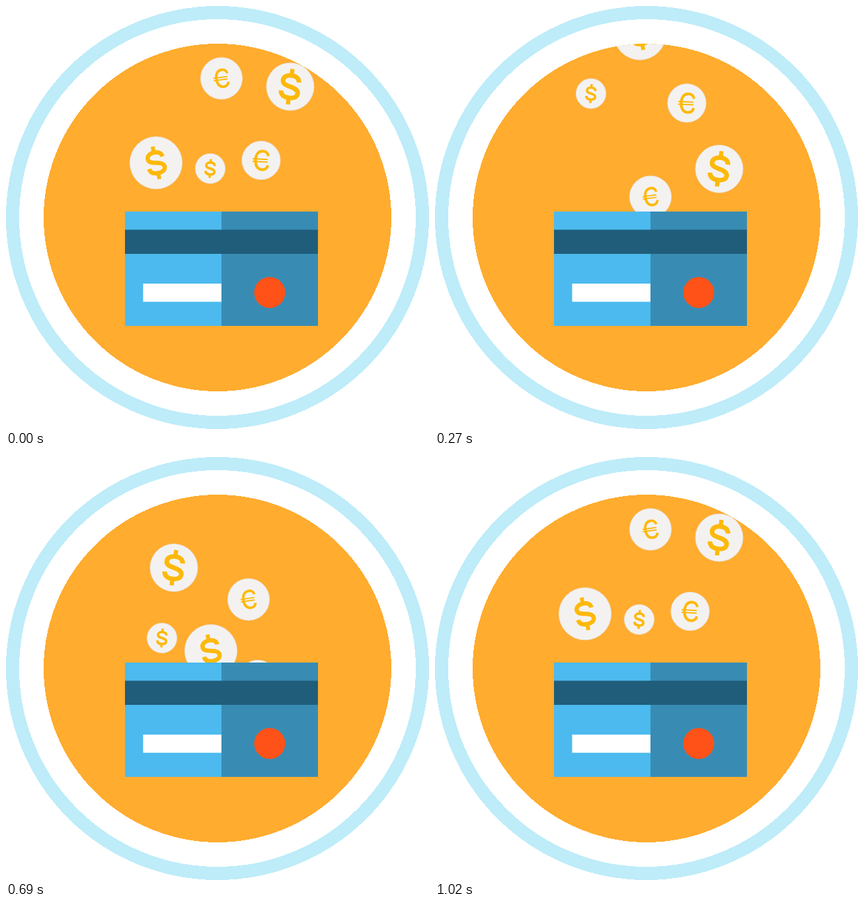
An HTML page for the animation above (1050 ms loop, 640x640 px).

```html
<!DOCTYPE html>
<html lang="en">
<head>
<meta charset="utf-8">
<title>Coins falling into a card</title>
<style>
  html, body { margin: 0; width: 100%; height: 100%; overflow: hidden; background: #fff; }
  svg { display: block; width: 100%; height: 100%; }
</style>
</head>
<body>
<svg viewBox="0 0 640 640">
  <defs>
    <clipPath id="disc"><circle cx="320" cy="320" r="263"/></clipPath>
    <g id="dollar" fill="none" stroke="#fdb90b" stroke-width="7">
      <path d="M12.3-8C12-14 7-17 0-17C-7-17-12-13.5-12-8.5C-12-3-7-1.6 0 0C8 1.8 12.5 4 12.5 9C12.5 14 7.5 17 0 17C-7.5 17-12.5 14-13 7.5"/>
      <path d="M0-27V-17M0 17V27" stroke-width="6.4"/>
    </g>
    <g id="euro" fill="none" stroke="#fdb90b" stroke-width="4.2">
      <path d="M10.5-7C10-11.5 6.5-14 2-14C-5-14-8.5-8-8.5 0C-8.5 8-5 14 2 14C6.5 14 10 11.5 10.5 7"/>
      <path d="M-13-1.8H10M-13 2.2H10" stroke-width="2"/>
    </g>
  </defs>
  <g shape-rendering="crispEdges">
    <circle cx="320" cy="320" r="310" fill="none" stroke="#beecf9" stroke-width="20"/>
    <circle cx="320" cy="320" r="263" fill="#ffac2f"/>
  </g>
  <g id="coins" clip-path="url(#disc)"></g>
  <g id="card">
    <path d="M180 311H326V484H180Z" fill="#4cbaee"/>
    <path d="M326 311H472V484H326Z" fill="#388cb4"/>
    <path d="M180 338.5H472V375H180Z" fill="#205d7a"/>
    <path d="M207.5 420H326V447.5H207.5Z" fill="#fff"/>
    <circle cx="399" cy="433.5" r="23.5" fill="#ff5219"/>
  </g>
</svg>
<script>
const STEP_MS = 30;
const LOOP_MS = 1050;
const CYCLE = 34;      // steps before the pose repeats
const HIDDEN_Y = 400;  // fully behind the card

// start: step of entry, y: height at entry, speed: pixels per step
const coins = [
  { sign: 'dollar', x: 227, r: 40, scale: .93, tilt: -12, start: 25, y: 102, speed: 15.03 },
  { sign: 'euro', x: 326, r: 32, scale: .92, tilt: -8, start: 29, y: 10, speed: 19.9 },
  { sign: 'dollar', x: 430, r: 36.4, scale: 1, tilt: 7.5, start: 27, y: 25.3, speed: 13.82 },
  { sign: 'dollar', x: 309, r: 23, scale: .53, tilt: 4, start: 23, y: 16, speed: 20.9 },
  { sign: 'euro', x: 386, r: 29.5, scale: 1, tilt: 3, start: 24, y: 64.3, speed: 16.92 },
  { sign: 'dollar', x: 236, r: 23, scale: .53, tilt: 4, start: 0, y: 41.6, speed: 10.1 },
  { sign: 'euro', x: 381, r: 29.5, scale: 1, tilt: 3, start: 0, y: 25, speed: 13.54 },
  { sign: 'dollar', x: 310, r: 40, scale: .93, tilt: -12, start: 6, y: -12, speed: 17.95 },
  { sign: 'dollar', x: 254, r: 36.4, scale: 1, tilt: 7.5, start: 13, y: 2.5, speed: 16.5 },
  { sign: 'euro', x: 367, r: 32, scale: .92, tilt: -8, start: 14, y: 54, speed: 17.95 }
];

const layer = document.getElementById('coins');
layer.innerHTML = coins.map(c => `<g>
  <circle r="${c.r - .4}" fill="#f4f2f1" stroke="#eadfd2" stroke-width=".9"/>
  <use href="#${c.sign}" transform="rotate(${c.tilt}) scale(${c.scale})"/></g>`).join('');

function draw(ms) {
  const step = Math.floor((ms % LOOP_MS) / STEP_MS) % CYCLE;
  coins.forEach((c, i) => {
    const age = (step - c.start + CYCLE) % CYCLE;
    const y = c.y + c.speed * age;
    const node = layer.children[i];
    node.setAttribute('transform', `translate(${c.x} ${y.toFixed(2)})`);
    node.setAttribute('visibility', y < HIDDEN_Y ? 'visible' : 'hidden');
  });
}

const origin = performance.now();
function tick() {
  draw(performance.now() - origin);
  requestAnimationFrame(tick);
}
tick();
</script>
</body>
</html>
```
